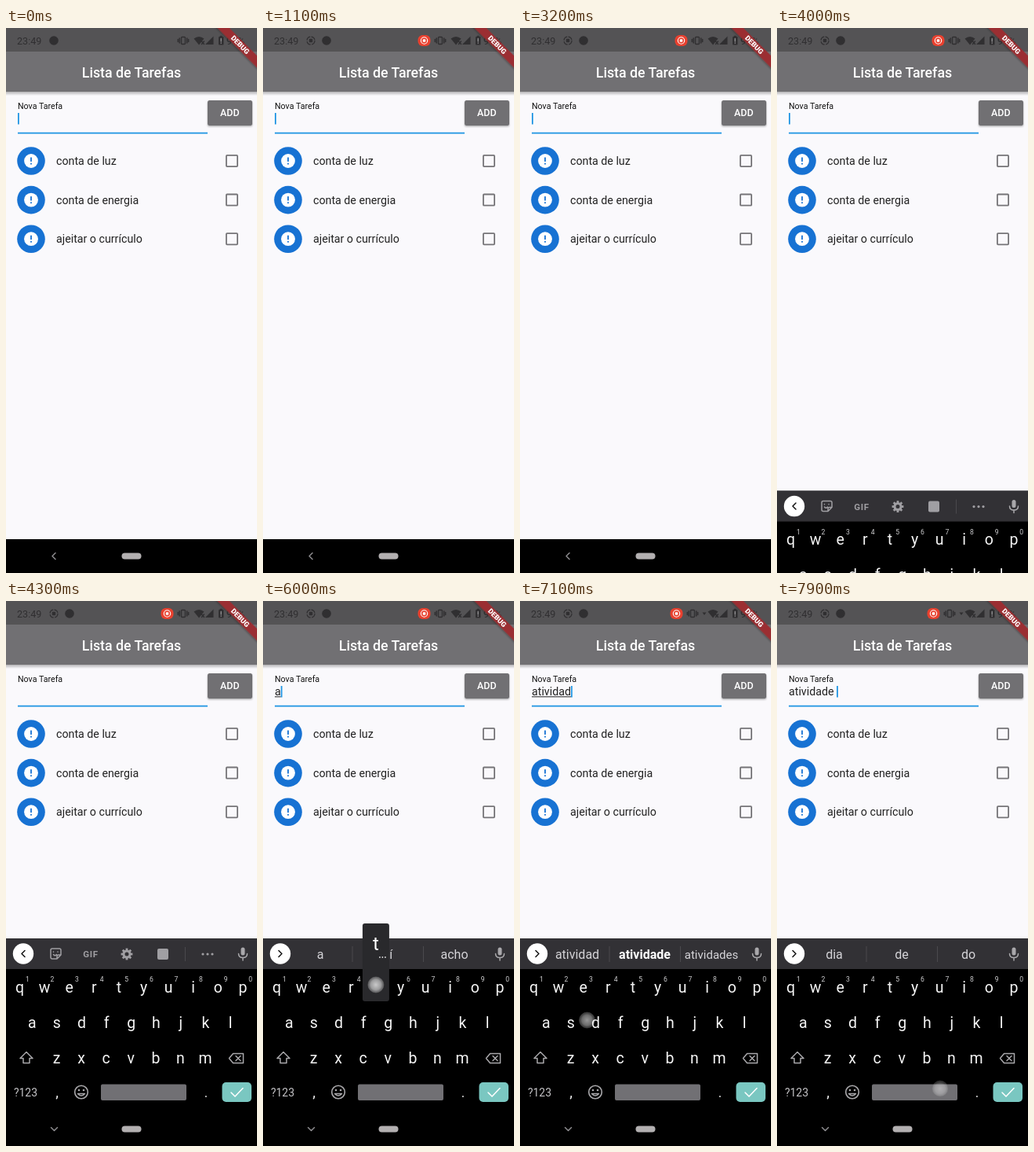
An HTML page that plays this animation: 320x693 px, repeating every 8000 ms.

```html
<!DOCTYPE html>
<html lang="pt">
<head>
<meta charset="utf-8">
<title>Lista de Tarefas</title>
<style>
html, body { margin: 0; width: 100%; height: 100%; overflow: hidden; background: #faf9fc; }
svg { display: block; width: 100%; height: 100%; font-family: Roboto, sans-serif; }
text { white-space: pre; }
.mid { text-anchor: middle; }
.line { fill: none; stroke-width: 1.5; stroke-linecap: round; stroke-linejoin: round; }
</style>
</head>
<body>
<svg id="stage" viewBox="0 0 320 693"></svg>
<script>
const LOOP = 8000;
const STEP = 31.6;
const ROWS = [['qwertyuiop', 17.5, 491], ['asdfghjkl', 33.3, 536], ['zxcvbnm', 64.5, 581]];
const TASKS = ['conta de luz', 'conta de energia', 'ajeitar o currículo'];

// key, press, release, horizontal offset of the finger
const PRESSES = [
  ['a', 5720, 5800, 0], ['t', 5960, 6060, 0], ['i', 6290, 6380, 0], ['v', 6610, 6680, 0],
  ['i', 6740, 6790, 0], ['d', 6840, 6880, -6], ['a', 6930, 6980, 0], ['d', 7030, 7070, -11],
  ['e', 7250, 7330, 0], [' ', 7740, 7840, 0]
];
const HINTS = {
  'a': ['a', 'aí', 'acho'],
  'at': ['at', 'até', 'ate'],
  'ati': ['ati', 'até', 'ativo'],
  'ativ': ['ativ', 'ativo', 'ativa'],
  'ativi': ['ativi', 'atividade', 'atividades'],
  'ativid': ['ativid', 'atividade', 'atividades'],
  'ativida': ['ativida', 'atividade', 'atividades'],
  'atividad': ['atividad', 'atividade', 'atividades'],
  'atividade': ['atividade', 'atividades', 'ativo'],
  'atividade ': ['dia', 'de', 'do']
};

const keyPos = { ' ': [208, 623] };
ROWS.forEach(([keys, x, y]) => [...keys].forEach((k, i) => keyPos[k] = [x + i * STEP, y]));

const text = (x, y, size, fill, s, extra = '') =>
  `<text x="${x}" y="${y}" font-size="${size}" fill="${fill}" ${extra}>${s}</text>`;
const mid = (x, y, size, fill, s, extra = '') => text(x, y, size, fill, s, `class="mid" ${extra}`);
const rect = (x, y, w, h, fill, extra = '') =>
  `<rect x="${x}" y="${y}" width="${w}" height="${h}" fill="${fill}" ${extra}/>`;
const disc = (x, y, r, fill, extra = '') => `<circle cx="${x}" cy="${y}" r="${r}" fill="${fill}" ${extra}/>`;
const line = (d, color, extra = '') => `<path class="line" d="${d}" stroke="${color}" ${extra}/>`;
const group = (id, body, extra = '') => `<g id="${id}" ${extra}>${body}</g>`;

function taskRow(label, i) {
  const y = 169 + i * 49.6;
  return disc(32, y, 17.8, '#1772d3') + disc(32, y, 8.9, '#fff') +
    rect(31.1, y - 4.5, 1.8, 5.4, '#1772d3') + rect(31.1, y + 2.7, 1.8, 1.8, '#1772d3') +
    text(64, y + 5, 14.22, '#222', label) +
    rect(280.9, y - 7.1, 14.2, 14.2, 'none', 'stroke="#757477" stroke-width="1.8" rx="1"');
}

function statusBar() {
  const c = '#302f31';
  const vibrate = rect(223.5, 11.5, 5, 9, 'none', `stroke="${c}" stroke-width="1.4" rx="1"`) +
    line('M221.2 13v6M219.3 14.5v3M230.8 13v6M232.7 14.5v3', c, 'stroke-width="1"');
  return rect(0, 0, 320, 30, '#545355') + text(14, 20.5, 12.6, c, '23:49') +
    group('stopIcon', disc(61, 16, 5, 'none', `stroke="${c}" stroke-width="1.2" stroke-dasharray="6.4 1.45"`) +
      rect(58.8, 13.8, 4.4, 4.4, c, 'rx="1"')) +
    group('appIcon', disc(61, 16, 5.8, c)) +
    group('shifting', group('record', rect(197.5, 9, 16, 14, '#e8412f', 'rx="6"') +
      disc(205.5, 16, 4.2, 'none', 'stroke="#fff" stroke-width="1.1"') +
      rect(203.7, 14.2, 3.6, 3.6, '#fff', 'rx=".8"')) + vibrate) +
    group('tiny', `<path d="M232.5 14.5h5l-2.5 3.5z" fill="${c}"/>`) +
    `<path d="M239.5 13.5Q246 8.5 252.5 13.5L246 21.5zM254 21h10.5V10.5z" fill="${c}"/>` +
    line('M249.5 17l3 3.5M252.5 17l-3 3.5', c, 'stroke-width="1"') +
    rect(271, 11, 6.5, 10.5, c, 'rx="1"') + rect(272.7, 9.8, 3, 2, c) +
    line('M274.2 13.5v3.5M274.2 19v.2', '#8b8a8c', 'stroke-width="1"') +
    text(281, 20.5, 12.6, c, '94%');
}

function toolbar() {
  const c = '#a09fa3';
  const teeth = Array.from({ length: 8 }, (_, i) =>
    rect(152.6, 441.6, 2.8, 4, c, `transform="rotate(${i * 45} 154 449)"`)).join('');
  return line('M57 444q0-2 2-2h9q2 0 2 2v6l-5 5h-6q-2 0-2-2zM65 455v-3q0-2 2-2h3M60.5 446v.3M66 446v.3M60.5 449.5q2 2.5 4 0', c) +
    mid(108, 453, 11.5, c, 'GIF', 'font-weight="700" letter-spacing=".6"') +
    teeth + disc(154, 449, 4, 'none', `stroke="${c}" stroke-width="3"`) +
    rect(193, 442, 14, 14, c, 'rx="2"') + rect(228, 440, 1, 18, '#4a494d') +
    [251, 257, 263].map(x => disc(x, 449, 1.6, c)).join('');
}

function keyboard() {
  const c = '#a9a8ab';
  const keys = ROWS.map(([row, x, y]) => [...row].map((k, i) =>
    mid(x + i * STEP, y + 6.5, 19.5, '#f5f5f5', k)).join('')).join('');
  const digits = [...'1234567890'].map((d, i) => mid(27.3 + i * STEP, 484, 8.6, '#d0d0d2', d)).join('');
  const hints = [73, 159, 244].map(x => mid(x, 455, 16, '#d5d4d8', '')).join('');
  return rect(0, 429, 320, 264, '#000') + rect(0, 429, 320, 39, '#323135') +
    disc(22, 448.5, 13.2, '#fff') + line('', '#111', 'id="chevron" stroke-width="1.7"') +
    group('tools', toolbar()) +
    group('hints', rect(113.5, 439, 1, 20, '#4a494d') + rect(204, 439, 1, 20, '#4a494d') + hints) +
    rect(299.5, 440.5, 5, 10, c, 'rx="2.5"') + line('M296.5 448.5q0 5 5.5 5t5.5-5M302 454v3', c) +
    keys + digits +
    line('M26 573.5l8 8h-4v6h-8v-6h-4z', c) +
    line('M284.5 581.5l5-6h13v12h-13zM293 578.5l6 6M299 578.5l-6 6', c) +
    mid(25, 630, 14, '#c4c3c6', '?123') + mid(65, 631, 19, '#eee', ',') + mid(255, 631, 19, '#ccc', '.') +
    disc(96, 624.5, 8.3, 'none', `stroke="${c}" stroke-width="1.6"`) +
    disc(93, 622, 1.3, c) + disc(99, 622, 1.3, c) + line('M91.5 626.5q4.500 5 9 0z', c) +
    rect(121, 614.500, 109, 20.500, '#717074', 'rx="2"') +
    rect(275.500, 612, 37.500, 25, '#7ac7c1', 'rx="5"') +
    line('M287 625l5 5 10-10.500', '#fff', 'stroke-width="1.800"') +
    line('M57.500 669.500l4 4 4-4', '#8d8c8f') + rect(147.500, 667.500, 25, 8, '#b3b0b1', 'rx="4"');
}

const stage = document.getElementById('stage');
stage.innerHTML = `<defs>
  <radialGradient id="finger"><stop offset="0" stop-color="#fff" stop-opacity=".75"/>
    <stop offset=".65" stop-color="#fafafa" stop-opacity=".55"/><stop offset="1" stop-color="#eee" stop-opacity=".25"/></radialGradient>
  <linearGradient id="fall" x2="0" y2="1"><stop stop-opacity=".28"/><stop offset="1" stop-opacity="0"/></linearGradient>
  <filter id="shadow" x="-50%" y="-50%" width="200%" height="200%"><feDropShadow dx="0" dy="1.2" stdDeviation="1.3" flood-opacity=".35"/></filter>
  <clipPath id="list"><rect y="135" width="320" height="515"/></clipPath></defs>` +
  rect(0, 0, 320, 693, '#faf9fc') + TASKS.map(taskRow).join('') +
  group('field', text(15, 102.5, 10.67, '#111', 'Nova Tarefa') + rect(15, 132.7, 242, 1.8, '#2196e3') +
    text(15, 120, 14.22, '#222', '', 'id="typed"') + rect(15, 121.3, 0, 1, '#222', 'id="compose"') +
    rect(15, 108, 1.8, 14.5, '#2196e3', 'id="cursor"')) +
  rect(257, 92, 57, 32, '#717073', 'rx="2.5" filter="url(#shadow)"') +
  mid(285.3, 112.4, 12.44, '#fff', 'ADD', 'font-weight="500"') +
  group('clip', group('spinner', disc(0, 0, 17.8, '#fff', 'filter="url(#shadow)"') +
    line('', '#2196e3', 'id="arc" stroke-width="2" style="stroke-linecap:butt"') +
    '<path id="tip" d="M-4 0h8l-4 4z" fill="#2196e3"/>'), 'clip-path="url(#list)"') +
  rect(0, 30, 320, 51, '#717073') + rect(0, 81, 320, 5, 'url(#fall)') + statusBar() +
  mid(160, 62.5, 17.78, '#fff', 'Lista de Tarefas', 'font-weight="500"') +
  `<g transform="translate(320) rotate(45)">` +
  rect(-50, 24.9, 100, 10.67, '#9b2f30', 'filter="url(#shadow)"') +
  mid(0, 33.4, 9.07, '#fff', 'DEBUG', 'font-weight="900"') + '</g>' +
  rect(0, 650, 320, 43, '#000') + line('M63 667.5l-4 4 4 4', '#8d8c8f') +
  rect(147.5, 667.5, 25, 8, '#b3b0b1', 'rx="4"') +
  group('keyboard', keyboard()) +
  group('popup', rect(-17, -81, 34, 99, '#29292c', 'rx="3"') + mid(0, -47, 24, '#fff', '') +
    [5, 8.5, 12].map(x => disc(x, -38, .9, '#ddd')).join('')) +
  group('touch', disc(0, 0, 10, 'url(#finger)', 'stroke="#888" stroke-opacity=".4" stroke-width="1"'));

const $ = id => document.getElementById(id);
const hintTexts = [...$('hints').querySelectorAll('text')];
const popupText = $('popup').querySelector('text');
const show = (id, on) => $(id).setAttribute('opacity', +on);
const move = (id, x, y, more = '') => $(id).setAttribute('transform', `translate(${x} ${y}) ${more}`);
const ramp = (t, a, b) => Math.min(1, Math.max(0, (t - a) / (b - a)));
const easeOut = p => 1 - (1 - p) ** 3;
const smooth = p => p * p * (3 - 2 * p);
const mix = (a, b, p) => a + (b - a) * p;

function arcPath(from, sweep, r = 7.6) {
  const at = a => `${r * Math.cos(a)} ${r * Math.sin(a)}`;
  return `M${at(from)}A${r} ${r} 0 ${+(sweep > Math.PI)} 1 ${at(from + sweep)}`;
}

function drawSpinner(t) {
  const pull = easeOut(ramp(t, 1600, 1870));
  const y = mix(mix(112, 209, pull), 192.5, smooth(ramp(t, 1910, 2060)));
  move('spinner', 160, y, `scale(${1 - ramp(t, 3000, 3180)})`);
  show('spinner', t >= 1600 && t < 3180);
  let from, sweep;
  if (t < 1950) {
    sweep = 4.5 * pull;
    from = mix(-2.4, -.15, pull);
  } else {
    const cycle = (t - 1950) / 1333 + .5, p = cycle % 1;
    const head = smooth(ramp(p, 0, .5)), tail = smooth(ramp(p, .5, 1));
    sweep = .15 + 4.6 * (head - tail);
    from = -.15 + 4.6 * tail + (cycle - .5) * 5.2;
  }
  $('arc').setAttribute('d', arcPath(from, sweep));
  const end = from + sweep;
  move('tip', 7.6 * Math.cos(end), 7.6 * Math.sin(end), `rotate(${end * 180 / Math.PI})`);
  show('tip', t < 1950);
}

function drawTouch(t) {
  const gestures = [
    [1600, 1830, 205, 340, 225, 554], [3620, 3740, 105, 116, 105, 116],
    ...PRESSES.map(([k, a, b, dx]) => {
      const [x, y] = keyPos[k];
      return [a, b, x + dx, y - 3, x + dx, y - 3];
    })
  ];
  const g = gestures.filter(g => t >= g[0]).pop();
  show('touch', g ? 1 - ramp(t, g[1], g[1] + 150) : 0);
  if (!g) return;
  const p = smooth(ramp(t, g[0], g[1]));
  move('touch', mix(g[2], g[4], p), mix(g[3], g[5], p));
}

function drawTyping(t) {
  const done = PRESSES.filter(p => t >= p[2]);
  const value = done.map(p => p[0]).join('');
  $('typed').textContent = value;
  const width = value ? $('typed').getComputedTextLength() : 0;
  $('compose').setAttribute('width', value.endsWith(' ') ? 0 : width);
  $('cursor').setAttribute('x', 15 + width);
  const reset = done.length ? done[done.length - 1][2] : t >= 3800 ? 3800 : 100;
  show('cursor', Math.floor(Math.max(0, t - reset) / 500) % 2 === 0);

  show('tools', !value);
  show('hints', !!value);
  $('chevron').setAttribute('d', value ? 'M20 444.500l4 4-4 4' : 'M24 444.500l-4 4 4 4');
  const words = HINTS[value] || ['', '', ''];
  hintTexts.forEach((el, i) => {
    el.textContent = words[i];
    el.setAttribute('font-size', words[i].length > 9 ? 15 : 16);
    const strong = i === 1 && words[i] === 'atividade';
    el.setAttribute('font-weight', strong ? 700 : 400);
    el.setAttribute('fill', strong ? '#fff' : '#d5d4d8');
  });

  const held = PRESSES.find(([k, a, b]) => k !== ' ' && t >= a && t < b);
  show('popup', !!held);
  if (held) {
    popupText.textContent = held[0];
    move('popup', ...keyPos[held[0]]);
  }
}

function render(t) {
  const start = smooth(ramp(t, 150, 500));
  move('appIcon', 20 * start, 0);
  show('stopIcon', start);
  show('record', start);
  const extra = t >= 6600;
  move('shifting', extra ? -6 : 0, 0);
  show('tiny', extra);
  move('keyboard', 0, 264 * (1 - easeOut(ramp(t, 3950, 4280))));
  drawSpinner(t);
  drawTyping(t);
  drawTouch(t);
}

const began = performance.now();
function tick() {
  render((performance.now() - began) % LOOP);
  requestAnimationFrame(tick);
}
tick();
</script>
</body>
</html>
```
